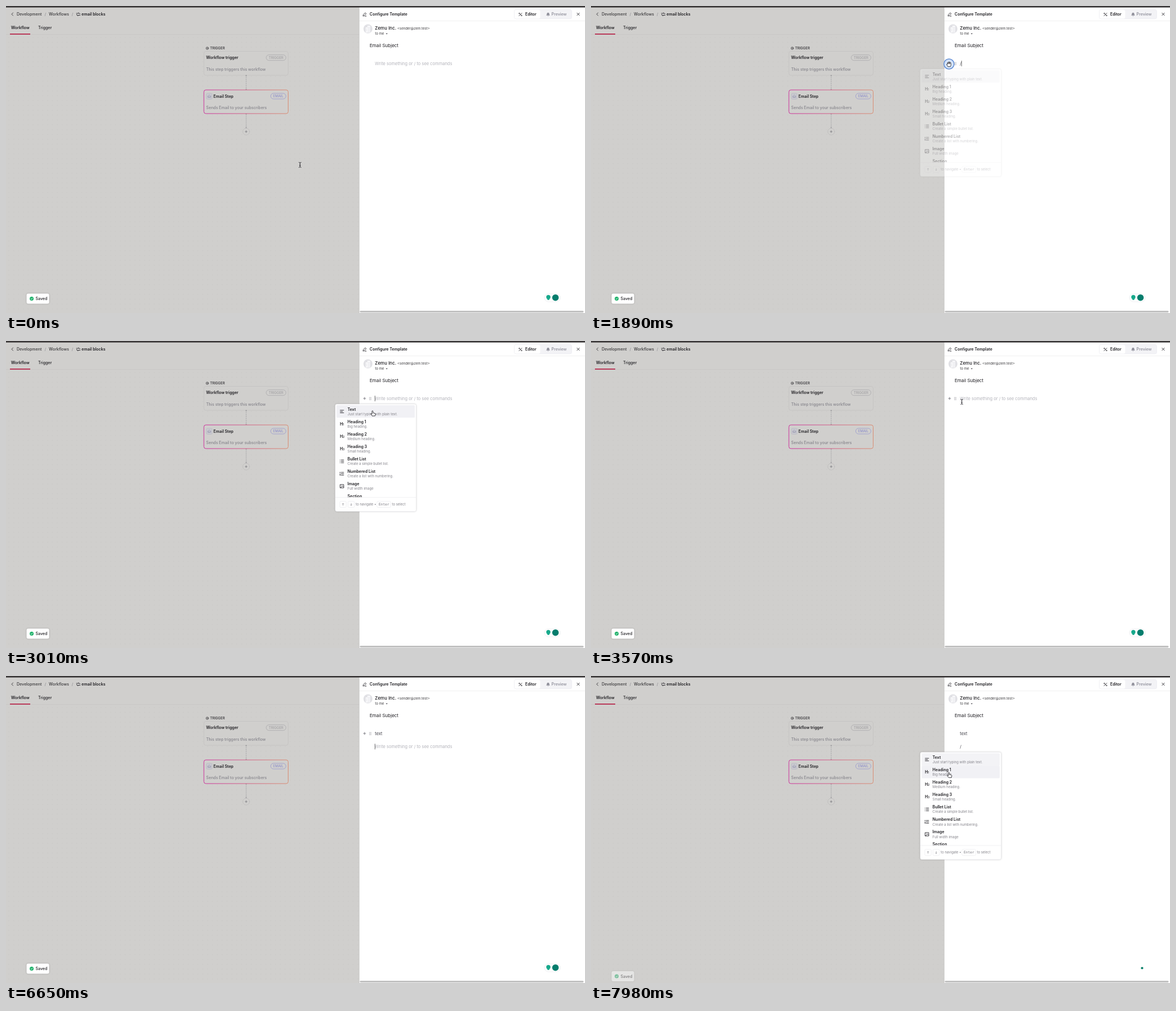
Write an HTML page that moves like this. It is 1027x545 px and loops after 8 s.

```html
<!DOCTYPE html>
<html lang="en">
<head>
<meta charset="utf-8">
<title>Email block editor</title>
<style>
  html, body { margin: 0; width: 100%; height: 100%; overflow: hidden; background: #fff; }
  svg { display: block; width: 100vw; height: 100vh; }
  text { font: 7px Inter, sans-serif; fill: #1d1c20; }
  .medium { font-weight: 500; }
  .bold { font-weight: 600; }
  .small { font-size: 6px; }
  .large { font-size: 8px; }
  .body { font-size: 7.5px; fill: #45444c; }
  .hint { font-size: 7.5px; fill: #b3b3ba; }
  .muted { fill: #84838a; }
  .key { font: 6.2px "DejaVu Sans Mono", monospace; fill: #77767e; }
  .line { fill: none; stroke: #29282d; stroke-width: .9; stroke-linecap: round; stroke-linejoin: round; }
  .shadow { filter: drop-shadow(0 .8px 1.6px #0003); }
</style>
</head>
<body>
<svg viewBox="0 0 1027 545">
  <defs>
    <pattern id="dots" x="4" y="55" width="8.6" height="8.6" patternUnits="userSpaceOnUse">
      <circle cx="1" cy="1" r=".55" fill="#bdbcba"/>
    </pattern>
    <linearGradient id="glow">
      <stop offset="0" stop-color="#cb309a"/><stop offset="1" stop-color="#d98b72"/>
    </linearGradient>
    <clipPath id="listClip"><rect x="584" y="112" width="144" height="165.5"/></clipPath>
  </defs>

  <!-- workflow canvas -->
  <rect width="1027" height="545" fill="#d0cfcd"/>
  <rect y="51" width="627" height="494" fill="url(#dots)"/>
  <path d="M0 50.5H627" stroke="#c6c5c3" stroke-width=".7"/>
  <rect x="7" y="49" width="36" height="1.6" fill="#b5173f"/>
  <path class="line" d="M12.5 12L10 14.5L12.5 17"/>
  <text x="19" y="17" class="medium" fill-opacity=".85">Development</text>
  <text x="68.5" y="17" class="muted">/</text>
  <text x="76" y="17" class="medium" fill-opacity=".85">Workflows</text>
  <text x="116.5" y="17" class="muted">/</text>
  <path class="line" d="M125 13H130L128.8 11.8M131.5 16.5H126.5L127.7 17.7M125.5 16V14.8M131 14.5V13.4"/>
  <text x="134" y="17" class="bold">email blocks</text>
  <text x="9" y="41" class="bold">Workflow</text>
  <text x="57" y="41" class="medium">Trigger</text>

  <rect x="351" y="80.5" width="149.5" height="42.5" rx="3.5" fill="#d0cfcd" stroke="#c3c2c0" stroke-width=".8"/>
  <circle class="line" cx="357" cy="75" r="2.2" style="stroke-width:.7"/>
  <circle cx="357" cy="75" r=".8" fill="#333"/>
  <text x="362" y="77.2" class="small bold" fill-opacity=".8">TRIGGER</text>
  <text x="355" y="94.4" class="bold">Workflow trigger</text>
  <rect x="461.5" y="86.7" width="35" height="10" rx="5" fill="none" stroke="#aaa9ab" stroke-width=".8"/>
  <text x="479" y="93.9" class="small" text-anchor="middle" style="fill:#99989c">TRIGGER</text>
  <text x="355" y="114.5" class="medium muted">This step triggers this workflow</text>

  <path d="M426 123V149M426 191V216" stroke="#96959a" stroke-width=".8" stroke-dasharray="2 1.5"/>
  <g fill="#a4a3a6"><circle cx="426" cy="123.5" r="1.2"/><circle cx="426" cy="148" r="1.2"/><circle cx="426" cy="191.5" r="1.2"/><circle cx="426" cy="216" r="1.2"/></g>
  <rect x="351" y="149" width="149.5" height="42" rx="3.5" fill="#d0cfcd" stroke="url(#glow)"/>
  <rect x="355.3" y="155" width="10.5" height="10.5" rx="2.5" fill="#c9c9cf" stroke="#b4b4c2" stroke-width=".6"/>
  <path class="line" d="M358 162V160L360.5 158L363 160V162ZM358 160.3L360.5 161.5L363 160.3" style="stroke:#8e8eaa;stroke-width:.6"/>
  <text x="368" y="162.5" class="bold">Email Step</text>
  <rect x="469.5" y="155" width="27" height="10" rx="5" fill="none" stroke="#9798cf" stroke-width=".8"/>
  <text x="483" y="162.2" class="small" text-anchor="middle" style="fill:#8587cb">EMAIL</text>
  <text x="355" y="182.7" class="medium muted">Sends Email to your subscribers</text>
  <circle cx="426" cy="223" r="6" fill="#d0cfcd" stroke="#a9a8aa" stroke-width=".7" stroke-dasharray="1.5 1.2"/>
  <path d="M423.8 223H428.2M426 220.8V225.2" stroke="#77767b" stroke-width=".8"/>

  <!-- toasts -->
  <g id="saved">
    <rect class="shadow" x="36.5" y="510.5" width="40" height="18" rx="3" fill="#fff"/>
    <circle cx="45.5" cy="519.5" r="3.5" fill="#20b26b"/>
    <path d="M43.9 519.6L45.1 520.8L47.2 518.4" fill="none" stroke="#fff" stroke-width=".9"/>
    <text x="52.5" y="522" class="medium">Saved</text>
  </g>
  <g id="saving">
    <rect class="shadow" x="36.5" y="510.5" width="42" height="18" rx="3" fill="#fff"/>
    <circle class="line" cx="45.5" cy="519.8" r="3.1"/>
    <path class="line" d="M45.5 519.8V517"/>
    <text x="52.5" y="522" class="medium">Saving</text>
  </g>

  <!-- template panel -->
  <rect x="626.5" width="401" height="545" fill="#fff"/>
  <path d="M626.5 3V545" stroke="#bdbcbb" stroke-width=".6"/>
  <path d="M627 26.5H1027" stroke="#ececee" stroke-width=".8"/>
  <path class="line" d="M633.3 17.6L633.9 15.3L637.3 11.9L639 13.6L635.6 17ZM636.5 18H639"/>
  <text x="645" y="17.4" class="bold">Configure Template</text>
  <rect x="901.5" y="6.3" width="102" height="16.6" rx="3.5" fill="#f3f3f6" stroke="#ededf1" stroke-width=".8"/>
  <rect x="902" y="6.8" width="45.5" height="15.6" rx="3" fill="#fff"/>
  <path class="line" d="M910 12.5L915 17.5M910 17.5L915 12.5M909.7 13.8L911.3 12.2M913.8 17.8L915.3 16.2"/>
  <text x="921" y="17.4" class="bold">Editor</text>
  <path d="M958 16.8Q959.3 16 959.3 14Q959.5 11.7 961.5 11.7Q963.5 11.7 963.7 14Q963.7 16 965 16.8ZM960.4 17.4H962.6L961.5 18.5Z" fill="#91919c"/>
  <text x="967.5" y="17.4" class="bold" style="fill:#94949f">Preview</text>
  <path class="line" d="M1012.8 12.3L1017.2 16.7M1017.2 12.3L1012.8 16.7"/>

  <circle cx="642" cy="40.5" r="8" fill="#e1e1e5"/>
  <path d="M638 47V38H641V35H646V47Z" fill="#fafafc"/>
  <path d="M642.4 37V46M644.6 37V46M639.5 40V46" stroke="#cfcfd5" stroke-width=".9" stroke-dasharray="1 1"/>
  <text x="654.3" y="41.6" class="large medium">Zemu Inc.</text>
  <text x="694" y="41.6" class="small" fill-opacity=".85">&lt;sender@zem.test&gt;</text>
  <text x="654.6" y="50.8" class="small" fill-opacity=".85">to me</text>
  <path d="M673.6 48.4H677L675.3 50.2Z" fill="#44434a"/>
  <text x="645" y="73" class="large">Email Subject</text>

  <text id="first" x="654.3" y="104.8" class="body"></text>
  <text id="second" x="654.3" y="128" class="body"></text>
  <text id="hint" x="654.3" class="hint">Write something or / to see commands</text>
  <g id="handles">
    <path d="M633.6 102H638.4M636 99.6V104.4" stroke="#73727b" stroke-width=".9"/>
    <path d="M645 99.7V105M647.2 99.7V105" stroke="#85848d" stroke-width="1.1" stroke-dasharray="1.1 .9"/>
  </g>
  <rect id="caret" width=".7" height="10" fill="#333"/>

  <g id="widget">
    <rect x="955" y="511" width="28" height="14" rx="7" fill="#fff" stroke="#e9e9ed" stroke-width=".7"/>
    <circle cx="962" cy="516.7" r="3.7" fill="#17a98b"/>
    <path d="M960.3 520H963.7V521.8H960.3Z" fill="#17a98b"/>
    <circle cx="974.6" cy="517.7" r="5.8" fill="#047d6d"/>
  </g>
  <circle id="dot" cx="977.5" cy="518.5" r="2.1" fill="#0a8069"/>
  <rect x="627.5" y="541" width="397" height="3.2" rx="1.6" fill="#c1c1c1"/>
  <rect width="1027" height="2.6" fill="#393637"/>

  <!-- command menu -->
  <g id="menu">
    <rect class="shadow" x="584" y="112" width="143.5" height="190.5" rx="3" fill="#fff" stroke="#e4e4e8" stroke-width=".5"/>
    <g clip-path="url(#listClip)">
      <rect x="586.5" y="114" width="138.5" height="22.1" rx="1.5" fill="#f3f3f6"/>
      <rect id="hover" x="586.5" width="138.5" height="22.1" rx="1.5" fill="#f1f1f5"/>
      <g id="items"></g>
    </g>
    <path d="M584 277.7H727.5" stroke="#ebebef" stroke-width=".7"/>
    <g fill="#fff" stroke="#e8e8ed" stroke-width=".6">
      <rect x="592" y="284.5" width="11.5" height="11" rx="2"/><rect x="606.5" y="284.5" width="11.5" height="11" rx="2"/><rect x="658" y="284.5" width="24.5" height="11" rx="2"/>
    </g>
    <path class="line" d="M597.8 292V288.2L596.7 289.4M597.8 288.2L598.9 289.4M612.3 288.2V292L611.2 290.8M612.3 292L613.4 290.8" style="stroke:#77767e;stroke-width:.6"/>
    <text x="620.3" y="292.2" class="small muted">to navigate •</text>
    <text x="661" y="292.2" class="key">Enter</text>
    <text x="684.5" y="292.2" class="small muted">to select</text>
  </g>

  <g id="pointer">
    <circle id="ring" r="9" fill="#d3e3f9" stroke="#638fd6" stroke-width="1.5"/>
    <path id="beam" class="line" d="M-1.8-4.5Q0-4.5 0-3V3Q0 4.5-1.8 4.5M1.8-4.5Q0-4.5 0-3M0 3Q0 4.5 1.8 4.5M-1 .8H1"/>
    <path id="grab" class="line" style="fill:#fff" d="M-2.2 4.3L-4.2.7Q-4 -.4-2.8.5L-2.6-2.5Q-2-3.4-1.3-2.6Q-.7-4.4.2-3.5Q1.2-4.2 1.6-2.8Q2.8-3.4 3.1-2L3.5.8Q3.4 2.6 2.6 4.3ZM-1.3-2.6V-.4M.2-3.4V-.4M1.6-2.8V-.3"/>
    <path id="hand" class="line" style="fill:#fff" d="M-1 1.2Q-1-.2 0-.2Q1-.2 1 1.2V3.6L4 4.3Q5.4 4.7 5.2 6.2L4.6 9H-.2L-3 5.9Q-3.2 4.7-2 4.9L-1 5.7Z"/>
  </g>
</svg>

<script>
const LOOP = 8000, ROW = 22.1, MENU_DROP = 23.2;
const el = Object.fromEntries([...document.querySelectorAll('[id]')].map(node => [node.id, node]));

const dashes = 'M594.5-2.5H599M594.5 0H599M594.5 2.5H599';
const blocks = [
  ['Text', 'Just start typing with plain text.', 'M592.8-2.3H599M592.8 0H597M592.8 2.3H599'],
  ['Heading 1', 'Big heading.', 1],
  ['Heading 2', 'Medium heading.', 2],
  ['Heading 3', 'Small heading.', 3],
  ['Bullet List', 'Create a simple bullet list.', dashes + 'M592.5-2.5h.1M592.5 0h.1M592.5 2.5h.1'],
  ['Numbered List', 'Create a list with numbering.', dashes + 'M592.5-2.8v1.4M592.2.6h.8l-.8 2h.8'],
  ['Image', 'Full width image', 'M593-3H599V3H593ZM593.3 2.7L597-.6L599 1.4M594.9-1.2h.1'],
  ['Section', '', 'M593 2H599']
];
el.items.innerHTML = blocks.map(([name, note, icon], i) => `
  <g transform="translate(0 ${125.2 + i * ROW})">
    ${typeof icon === 'number'
      ? `<text x="592.3" y="2.6" class="bold">H<tspan style="font-size:4.5px">${icon}</tspan></text>`
      : `<path class="line" d="${icon}"/>`}
    <text x="605.8" y="-1.7" class="bold">${name}</text>
    <text x="605.8" y="6.7" class="small muted">${note}</text>
  </g>`).join('');

const path = [
  [0, 521.5, 282], [70, 521.5, 282], [1540, 635, 103], [1960, 635, 103], [2340, 648.5, 159.8],
  [2520, 648.5, 159.8], [2940, 650, 124], [3080, 650, 124], [3500, 657.7, 108],
  [7640, 657.7, 108], [7960, 634.7, 171.3], [LOOP, 634.7, 171.3]
];

const within = (t, from, to) => t >= from && t < to;
const ramp = (t, from, to) => Math.min(1, Math.max(0, (t - from) / (to - from)));
const show = (node, visible) => node.style.display = visible ? '' : 'none';

function pointerAt(t) {
  const i = Math.max(1, path.findIndex(point => point[0] > t));
  const [t0, x0, y0] = path[i - 1], [t1, x1, y1] = path[i];
  const p = ramp(t, t0, t1), ease = p * p * (3 - 2 * p);
  return [x0 + (x1 - x0) * ease, y0 + (y1 - y0) * ease];
}

function drawPointer(t, x, y, overMenu) {
  const kind = overMenu ? 'hand' : within(t, 1470, 2030) ? 'grab' : 'beam';
  for (const name of ['hand', 'grab', 'beam']) show(el[name], name === kind);
  show(el.ring, within(t, 1680, 1960));
  show(el.pointer, !within(t, 3700, 7640));
  el.pointer.setAttribute('transform', `translate(${x} ${y})`);
}

function drawMenu(t, x, y) {
  const late = t > 5000, top = 114 + (late ? MENU_DROP : 0);
  const opacity = late ? ramp(t, 7130, 7350) : ramp(t, 1820, 2030) * (1 - ramp(t, 3010, 3150));
  const row = Math.floor((y - top) / ROW);
  const over = opacity > .6 && row >= 0 && !within(t, 3700, 7640);
  el.menu.setAttribute('opacity', opacity);
  el.menu.setAttribute('transform', `translate(0 ${late ? MENU_DROP : 0})`);
  el.hover.setAttribute('y', 114 + row * ROW);
  show(el.menu, opacity > 0);
  show(el.hover, over);
  return over;
}

function drawEditor(t) {
  const typed = [3700, 3790, 3890, 3980].filter(key => t >= key).length;
  el.first.textContent = within(t, 1820, 3010) ? '/' : 'text'.slice(0, typed);
  el.second.textContent = t >= 7060 ? '/' : '';
  const onSecond = t >= 6440, line = onSecond ? el.second : el.first;
  const y = onSecond ? 128 : 104.8;
  show(el.hint, !line.textContent);
  el.hint.setAttribute('y', y);

  // The caret blinks every 490 ms, restarting at each edit.
  const edit = [1820, 3010, 3700, 3790, 3890, 3980, 6440, 7060].filter(key => t >= key).pop();
  show(el.caret, edit !== undefined && Math.floor((t - edit) / 495) % 2 === 0);
  el.caret.setAttribute('x', 654.2 + (line.textContent ? line.getComputedTextLength() : 0));
  el.caret.setAttribute('y', y - 7.7);
  show(el.handles, within(t, 1470, 7690));
}

function drawStatus(t) {
  const pushed = within(t, 2310, 2870) ? ramp(t, 2310, 2450) : 0;
  const leaving = ramp(t, 7840, 8100);
  el.saved.setAttribute('transform', `translate(0 ${25 * leaving - 15 * pushed})`);
  el.saved.setAttribute('opacity', 1 - Math.max(pushed, leaving));
  show(el.saving, within(t, 2310, 2870));
  const idle = within(t, 4300, 6020) || t >= 7130;
  show(el.widget, !idle);
  show(el.dot, idle);
}

function draw(now) {
  const t = now % LOOP, [x, y] = pointerAt(t);
  drawPointer(t, x, y, drawMenu(t, x, y));
  drawEditor(t);
  drawStatus(t);
  requestAnimationFrame(draw);
}
draw(0);
</script>
</body>
</html>
```
